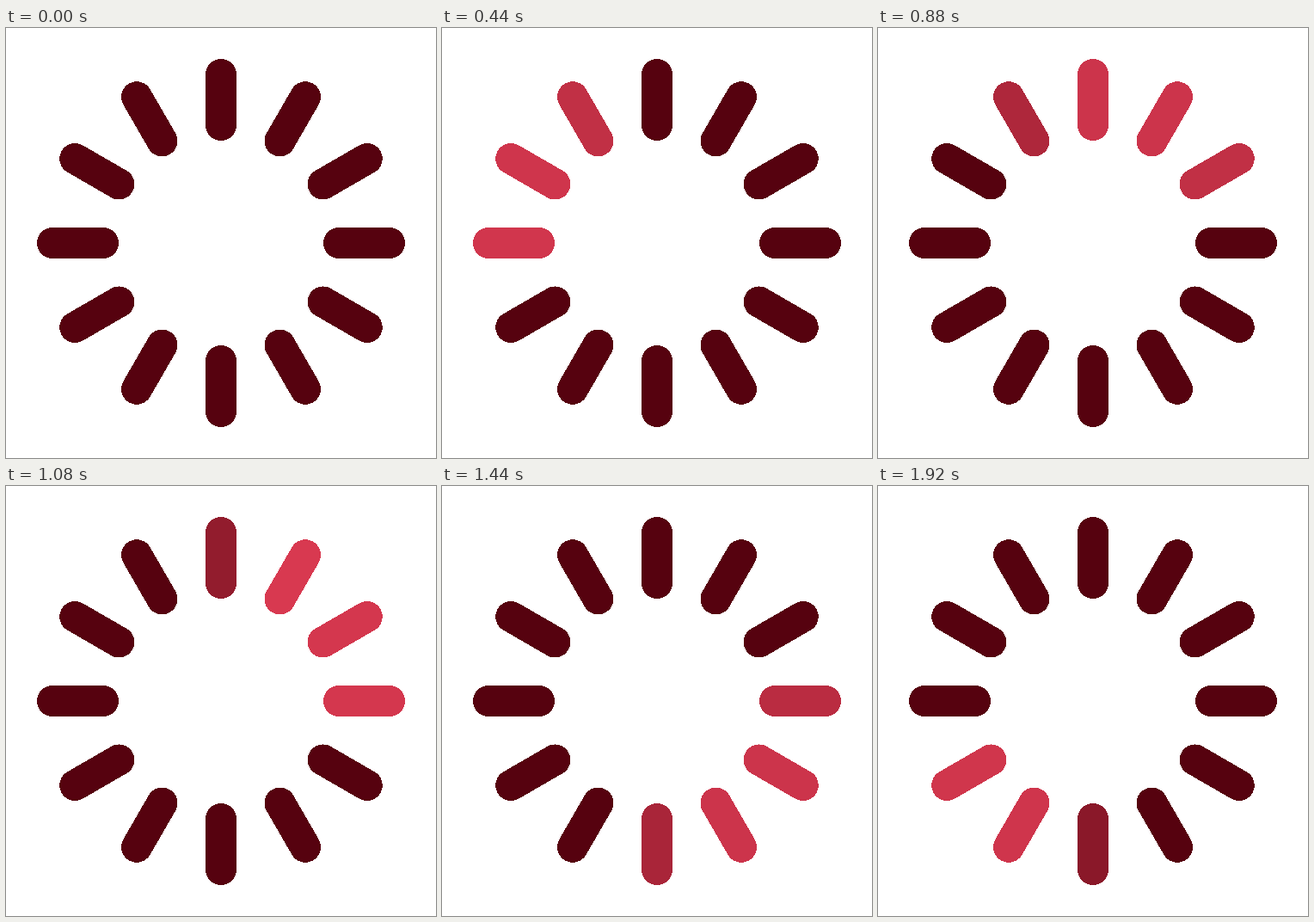
Animation of 500 by 500 pixels, one loop 2 s. Source, as an HTML page:

```html
<!DOCTYPE html>
<html lang="en">
<head>
<meta charset="utf-8">
<title>Spinner</title>
<style>
  html, body { margin: 0; width: 100%; height: 100%; overflow: hidden; background: #fff; }
  svg { display: block; width: 100vw; height: 100vh; }
  line { stroke-width: 36; stroke-linecap: round; shape-rendering: crispEdges; }
</style>
</head>
<body>
<svg viewBox="0 0 500 500"></svg>
<script>
const DARK = [86, 2, 15], LIT = [255, 74, 100];
const LOOP = 2000, SLOT = 40;
const DELAY = 3.32; // steps from one bar to the next

const svg = document.querySelector('svg');

// Bars in lighting order, clockwise from nine o'clock
const bars = Array.from({ length: 12 }, (_, i) => {
  const bar = document.createElementNS(svg.namespaceURI, 'line');
  const attrs = { x1: 250, y1: 54, x2: 250, y2: 113, transform: `rotate(${(i + 9) * 30} 250 250)` };
  for (const name in attrs) bar.setAttribute(name, attrs[name]);
  return svg.appendChild(bar);
});

// Eased ramp from 0 to 1, centred on mid
function ramp(t, mid, length) {
  const x = Math.min(1, Math.max(0, (t - mid) / length + 0.5));
  return x * x * (3 - 2 * x);
}

function glow(step, i) {
  const t = step - DELAY * i;
  const lit = ramp(t, 2.9, 1.6) - ramp(t, 13.95, 3.5);
  // All bars flash once per four bars, the outer ones of each four more strongly
  const flash = Math.cos(Math.PI * (step - 13.7) / (4 * DELAY)) ** 6;
  const strength = 0.15 + 0.14 * Math.abs(i % 4 - 1.5);
  return lit * (0.7 + strength * flash);
}

const mix = k => `rgb(${DARK.map((c, i) => Math.round(c + (LIT[i] - c) * k))})`;

function draw(now) {
  // Every twelfth slot repeats the step before it
  const step = Math.floor(Math.floor(now % LOOP / SLOT) * 11 / 12);
  bars.forEach((bar, i) => bar.setAttribute('stroke', mix(glow(step, i))));
}

const start = performance.now();
function tick() {
  draw(performance.now() - start);
  requestAnimationFrame(tick);
}
tick();
</script>
</body>
</html>
```
